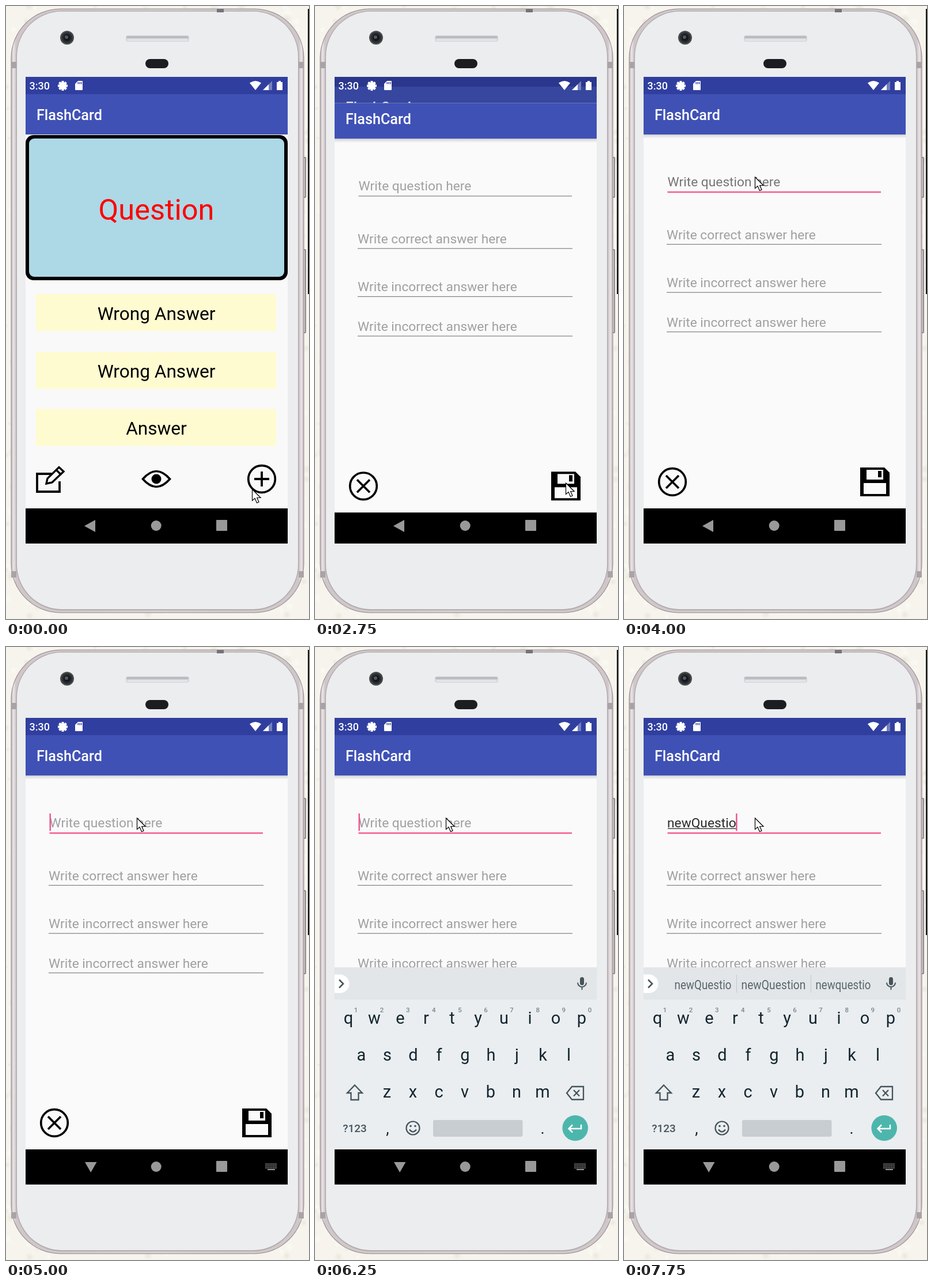
An HTML page with a canvas that plays this animation: 526 px wide and 1064 px high, repeating every 8 s.

```html
<!DOCTYPE html>
<html lang="en">
<head>
<meta charset="utf-8">
<title>Flash card app</title>
<style>
html, body { margin: 0; width: 100%; height: 100%; overflow: hidden; background: #f5f3eb; }
canvas { display: block; }
</style>
</head>
<body>
<canvas id="stage" width="526" height="1064"></canvas>
<script>
const W = 526, H = 1064, LOOP = 8000;
const stage = document.getElementById('stage');
let c = stage.getContext('2d');

// Each entry: start time, value. The latest started one holds.
const MOUSE = [[0, [427, 839]], [250, [435, 828]], [3250, [259, 314]], [3500, [227, 297]]];
const CARET = [[0, false], [4250, true], [4500, false], [5000, true], [6000, false], [6250, true]];
const TYPED = [[0, ''], [6500, 'new'], [6750, 'newQ'], [7250, 'newQues'], [7500, 'newQuest'], [7750, 'newQuestio']];
const WORDS = [
  [0, []],
  [6500, ['new', 'news', 'New']],
  [6750, ['newQ', 'new', 'New']],
  [7250, ['newQues', 'newQuest', 'newques']],
  [7500, ['newQuest', 'newQuestion', 'newquest']],
  [7750, ['newQuestio', 'newQuestion', 'newquestio']]
];
const at = (track, t) => track.filter(k => k[0] <= t).pop()[1];

function rect(x, y, w, h, fill) {
  c.fillStyle = fill;
  c.fillRect(x, y, w, h);
}
function round(x, y, w, h, r, fill) {
  c.beginPath();
  c.roundRect(x, y, w, h, r);
  c.fillStyle = fill;
  c.fill();
}
function disc(x, y, r, fill) {
  c.beginPath();
  c.arc(x, y, r, 0, 7);
  c.fillStyle = fill;
  c.fill();
}
function ring(x, y, r, width, color) {
  c.beginPath();
  c.arc(x, y, r, 0, 7);
  c.lineWidth = width;
  c.strokeStyle = color;
  c.stroke();
}
function fillPath(d, fill) {
  c.fillStyle = fill;
  c.fill(new Path2D(d));
}
function strokePath(d, width, color) {
  c.lineWidth = width;
  c.strokeStyle = color;
  c.stroke(new Path2D(d));
}
function text(s, x, y, size, color, align = 'left', weight = 400) {
  c.font = `${weight} ${size}px Roboto, sans-serif`;
  c.textAlign = align;
  c.fillStyle = color;
  c.fillText(s, x, y);
  return c.measureText(s).width;
}
function shifted(dy, draw) {
  c.save();
  c.translate(0, dy);
  draw();
  c.restore();
}
function clipped(x, y, w, h, draw) {
  c.save();
  c.beginPath();
  c.rect(x, y, w, h);
  c.clip();
  draw();
  c.restore();
}
function layer(draw) {
  const el = document.createElement('canvas'), keep = c;
  el.width = W;
  el.height = H;
  c = el.getContext('2d');
  draw();
  c = keep;
  return el;
}

function paper() {
  rect(0, 0, W, H, '#f6f4ec');
  let seed = 7;
  const rnd = () => (seed = seed * 16807 % 2147483647) / 2147483647;
  for (let i = 0; i < 900; i++) {
    const x = rnd() * W, y = rnd() * H, r = 3 + rnd() * 7;
    const g = c.createRadialGradient(x, y, 0, x, y, r);
    const tone = rnd() < 0.5 ? '226,221,207' : '255,254,250';
    g.addColorStop(0, `rgba(${tone},.55)`);
    g.addColorStop(1, `rgba(${tone},0)`);
    c.fillStyle = g;
    c.fillRect(x - r, y - r, 2 * r, 2 * r);
  }
}

function phone() {
  rect(524, 5, 2, 495, '#111');
  for (const [y, h] of [[262, 71], [422, 146]]) {
    round(515, y, 6, h, 2, '#8f898d');
    rect(516, y + 2, 3, h - 4, '#d5ced1');
  }
  round(8.5, 4.5, 509, 1049, 86, '#8e888b');
  const edge = c.createLinearGradient(9, 0, 517, 0);
  [[0, '#bdb4b8'], [0.008, '#ece6e8'], [0.016, '#cfc6c9'], [0.5, '#d8d2d4'],
   [0.984, '#cfc6c9'], [0.992, '#ece6e8'], [1, '#bdb4b8']].forEach(s => edge.addColorStop(...s));
  round(9.5, 5.5, 507, 1047, 85, edge);
  round(17.5, 8, 491, 1041, 80, '#b3a9ad');
  round(19, 9.5, 488, 1037.5, 78, '#ebedee');
  for (const y of [97, 981]) {
    rect(9, y, 9, 11, '#aaa3a6');
    rect(508, y, 9, 11, '#aaa3a6');
  }
  rect(366, 5, 12, 6, '#77727a');

  disc(106, 55, 12, '#4a4b4d');
  disc(106, 55, 9.5, '#2b2d30');
  disc(106, 55, 6, '#15181c');
  disc(105, 54, 3, '#4c5a66');
  round(208, 51, 110, 11, 4, '#d3d6d9');
  round(209, 52, 108, 4, 2, '#b9bdc1');
  round(210, 57, 106, 4, 2, '#e2e4e6');
  round(242, 92, 40, 16, 8, '#1c1d21');
}

function bars() {
  rect(34, 123, 455, 30, '#303f9f');
  rect(34, 153, 455, 70, '#3f51b5');
  text('FlashCard', 53, 198, 25.2, '#fff', 'left', 500);
}

function statusIcons() {
  text('3:30', 40.5, 145, 18, '#fff', 'left', 500);
  c.save();
  c.translate(98.5, 138.5);
  for (let i = 0; i < 4; i++) {
    rect(-2, -8.5, 4, 17, '#fff');
    c.rotate(Math.PI / 4);
  }
  c.restore();
  ring(98.5, 138.5, 4.7, 3.6, '#fff');
  fillPath('M125 130H132Q133 130 133 131V145Q133 146 132 146H121Q120 146 120 145V135Z', '#fff');
  for (const x of [124.5, 127.3, 130.1]) rect(x, 132, 1.5, 3.5, '#303f9f');
  fillPath('M433 146L423 133.5Q433 126.5 443 133.5Z', '#fff');
  fillPath('M462 130V146H446Z', '#7580bd');
  fillPath('M456 136V146H446Z', '#fff');
  fillPath('M473 130H477V132H480V146H470V132H473Z', '#fff');
}

function cardPage() {
  rect(34, 123, 455, 749, '#f9f9f9');
  bars();
  round(34, 224, 455, 252, 14, '#000');
  round(40, 230, 443, 240, 9, '#add8e6');
  text('Question', 261, 370.5, 50.5, '#f00', 'center');
  [['Wrong Answer', 500], ['Wrong Answer', 600.5], ['Answer', 699.5]].forEach(([s, y]) => {
    rect(52, y, 417, 64, '#fffbd0');
    text(s, 261, y + 44.5, 31.6, '#000', 'center');
  });
  // edit, view, add
  strokePath('M79 812H54V843H93V825', 3.8, '#000');
  strokePath('M70 829L72 820L92 800.5L100 808L80 827Z M87 805L95 813', 3.4, '#000');
  strokePath('M237.5 821Q261 794 284.5 821Q261 848 237.5 821Z', 3.6, '#000');
  disc(261, 821, 8.5, '#000');
  ring(444, 821, 23.3, 3.7, '#000');
  strokePath('M431 821H457M444 808V834', 3.8, '#000');
}

function formPage(t) {
  rect(34, 123, 455, 749, '#fafafa');
  const shade = c.createLinearGradient(0, 223, 0, 230);
  shade.addColorStop(0, 'rgba(0,0,0,.16)');
  shade.addColorStop(1, 'rgba(0,0,0,0)');
  rect(34, 223, 455, 7, shade);
  bars();
  const typed = at(TYPED, t), focus = t >= 4000;
  let end = 0;
  if (typed) {
    end = text(typed, 75, 313, 22.75, '#2b2b2b');
    rect(76, 314.5, end - 1, 1.3, '#2b2b2b');
  } else {
    text('Write question here', 75.5, 313, 22.75, focus && t < 4500 ? '#757575' : '#a0a0a0');
  }
  if (at(CARET, t)) rect(75.5 + end - (typed ? 1 : 0), 289, 2.4, 30, '#f0508a');
  if (focus) rect(75.5, 321.7, 370.5, 2.6, '#f4608f');
  else rect(75.5, 322, 370.5, 1.2, '#808080');
  [['correct', 404.5], ['incorrect', 488], ['incorrect', 556.5]].forEach(([kind, y]) => {
    text(`Write ${kind} answer here`, 74, y, 22.75, '#a0a0a0');
    rect(74, y + 8.5, 373, 1.2, '#808080');
  });
  // cancel, save
  ring(84, 826, 23.3, 3.7, '#000');
  strokePath('M73 815L95 837M95 815L73 837', 3.7, '#000');
  fillPath('M410 801H452L461 810V851H410Z', '#000');
  rect(421, 805, 29, 17, '#fafafa');
  rect(441, 807, 6, 11, '#000');
  rect(416, 828, 39, 19, '#fafafa');
}

function navBar(typing) {
  rect(34, 872, 455, 61, '#000');
  const grey = '#999';
  fillPath(typing ? 'M137 894H157.5L147.2 912Z' : 'M155 892V913L136 902.5Z', grey);
  disc(260.7, 902, 9, grey);
  round(365, 892, 19, 19, 1, grey);
  if (!typing) return;
  for (let row = 0; row < 3; row++)
    for (let i = 0; i < 6; i++) rect(450.5 + i * 3.4, 896.5 + row * 3.3, 2, 2, grey);
  rect(454, 906, 13, 2, grey);
}

function suggestions(words) {
  const cells = [[79, 195], [195, 324], [324, 437]];
  words.forEach((word, i) => {
    const [left, right] = cells[i];
    c.font = '400 22.75px Roboto, sans-serif';
    const squeeze = Math.min(1, (right - left - 17) / c.measureText(word).width);
    c.save();
    c.translate((left + right) / 2, 593.5);
    c.scale(squeeze, 1);
    text(word, 0, 0, 22.75, '#5a666c', 'center');
    c.restore();
    if (i) rect(left, 569, 1, 31, '#c3c9cc');
  });
}

function keyboard(t) {
  const ink = '#14252d', icon = '#45545b';
  const caps = t >= 6500 && t < 6750;
  rect(34, 556, 455, 322, '#eaeef1');
  rect(34, 556, 455, 56, '#e2e6e8');
  clipped(34, 556, 455, 56, () => round(20, 568.5, 39.5, 32, 16, '#fff'));
  strokePath('M42 577.5L49 584.5L42 591.5', 2.5, icon);
  round(460, 573, 7, 14, 3.5, icon);
  strokePath('M456 582.5A7.5 7.5 0 0 0 471 582.5M463.5 590V595', 2, icon);
  suggestions(at(WORDS, t));

  const rows = [['qwertyuiop', 58, 654], ['asdfghjkl', 80.5, 718], ['zxcvbnm', 125, 782]];
  for (const [keys, x, y] of rows)
    [...keys].forEach((k, i) =>
      text(caps ? k.toUpperCase() : k, x + i * 45, y, 29, ink, 'center'));
  for (let i = 0; i < 10; i++)
    text((i + 1) % 10, 71 + i * 45.1, 634, 11.5, '#7b868b', 'center', 500);

  const shift = 'M69 760.5L82 774H75.5V786H62.5V774H56Z';
  if (caps) fillPath(shift, icon);
  strokePath(shift, 2.3, icon);
  strokePath('M446 763H466V785.5H446L437 774.2Z M449 769L459 779.5M459 769L449 779.5', 2.3, icon);

  text('?123', 69, 842, 19, icon, 'center', 500);
  text(',', 126, 845, 27, ink, 'center');
  text('.', 395, 845, 27, ink, 'center');
  ring(170, 835, 11.5, 2.2, icon);
  disc(166, 831.5, 1.8, icon);
  disc(174, 831.5, 1.8, icon);
  strokePath('M164 837.5Q170 845.5 176 837.5', 2.2, icon);
  round(205, 821, 155.5, 29, 3, '#c8cdd1');
  disc(451.7, 835, 22.3, '#4db6ac');
  strokePath('M462 829V836H441M447 829.5L440.5 836L447 842.5', 2.5, '#fff');
}

function pointer([x, y]) {
  c.save();
  c.translate(x + 0.5, y);
  const arrow = 'M0 0V19.5L4.5 15.5L8 23.5L11.5 22L8.2 14.5H14.5Z';
  fillPath(arrow, '#fff');
  strokePath(arrow, 1.2, '#000');
  c.restore();
}

function screen(t) {
  navBar(t >= 4750);
  if (t < 2750) {
    cardPage();
  } else if (t < 3000) {
    // new page rises while the old one moves up under a scrim
    shifted(-13, cardPage);
    rect(34, 123, 455, 749, 'rgba(0,0,0,.12)');
    clipped(34, 168.5, 455, 711, () => shifted(7.3, () => formPage(t)));
  } else {
    formPage(t);
  }
  statusIcons();
  if (t >= 6250) {
    clipped(34, 123, 455, 749, () => keyboard(t));
  } else if (t >= 6000) {
    const keys = layer(() => keyboard(t));
    c.globalAlpha = 0.47;
    c.drawImage(keys, 0, 78);
    c.globalAlpha = 1;
  }
}

const backdrop = layer(() => { paper(); phone(); });
let shown = -1;

function frame() {
  const t = Math.floor(performance.now() % LOOP / 250) * 250;
  if (t !== shown) {
    shown = t;
    c.drawImage(backdrop, 0, 0);
    clipped(34, 123, 455, 810, () => screen(t));
    pointer(at(MOUSE, t));
  }
  requestAnimationFrame(frame);
}
frame();
</script>
</body>
</html>
```
